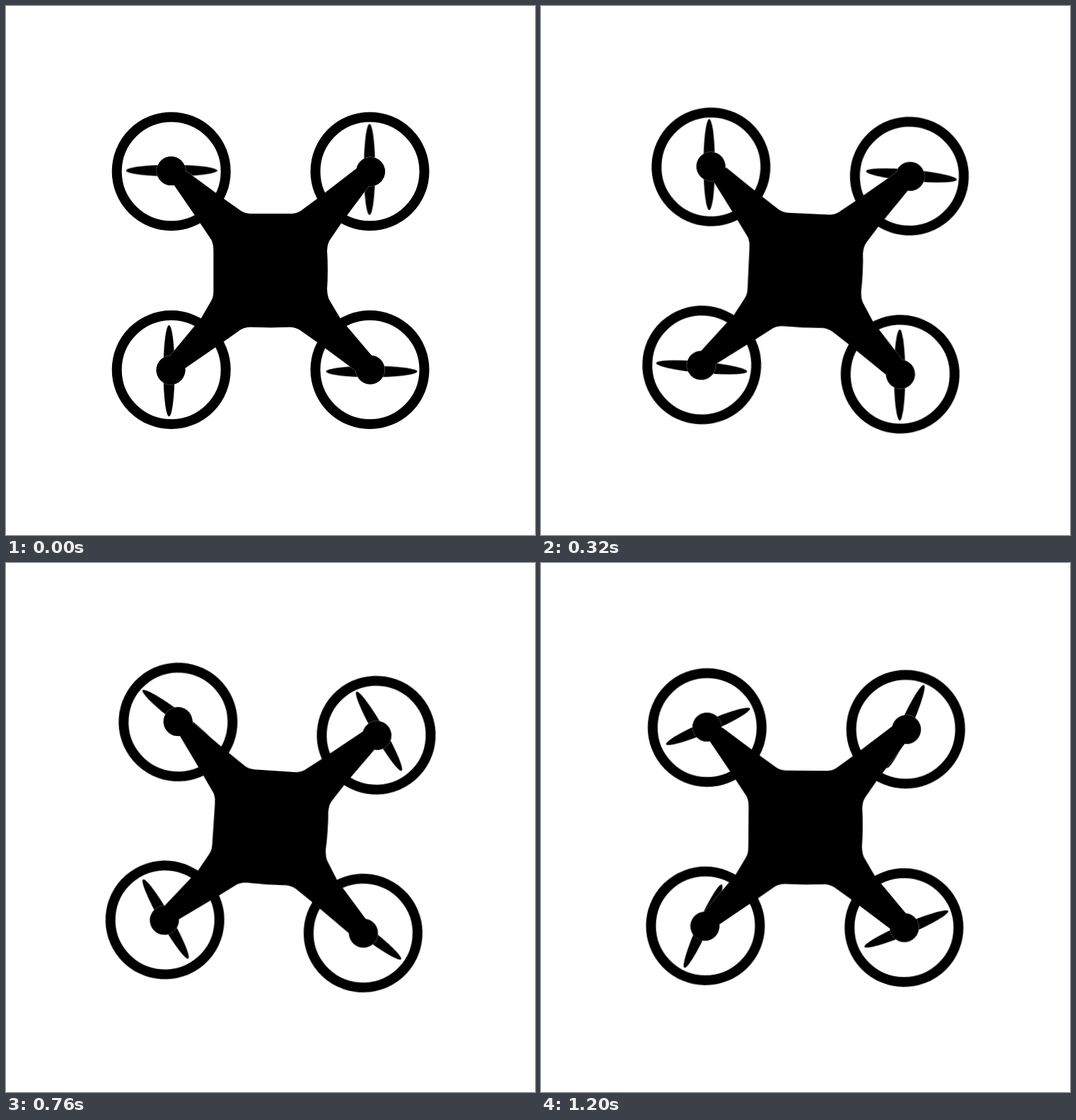
Write an HTML page that moves like this. It is 748 px wide and 749 px high and loops after 1.24 s.

```html
<!DOCTYPE html>
<html lang="en">
<head>
<meta charset="utf-8">
<title>Quadcopter</title>
<style>
  html, body { margin: 0; width: 100%; height: 100%; overflow: hidden; background: #fff; }
  svg { display: block; width: 748px; height: 749px; }

  .drone { transform-origin: 374px 374.5px; animation: sway 1240ms -1ms infinite; }
  .cw { animation: spin 1240ms -1ms infinite; }
  .ccw { animation: spin-back 1240ms -1ms infinite; }
  .seam { stroke: #fff; stroke-width: 1; stroke-opacity: .5; }
  .rings { fill: none; stroke: #000; stroke-width: 14; }

  /* Motion advances in 40 ms ticks */
  @keyframes sway {
    0% { transform: rotate(0deg); animation-timing-function: steps(15); }
    48.387% { transform: rotate(5deg); animation-timing-function: steps(16); }
    100% { transform: rotate(.2deg); }
  }
  @keyframes spin {
    0% { transform: rotate(0deg); animation-timing-function: steps(5); }
    16.129% { transform: rotate(52.6deg); animation-timing-function: steps(11); }
    51.6129% { transform: rotate(180deg); animation-timing-function: steps(15); }
    100% { transform: rotate(347.5deg); }
  }
  @keyframes spin-back {
    0% { transform: rotate(0deg); animation-timing-function: steps(5); }
    16.129% { transform: rotate(-52.6deg); animation-timing-function: steps(11); }
    51.6129% { transform: rotate(-180deg); animation-timing-function: steps(15); }
    100% { transform: rotate(-347.5deg); }
  }
</style>
</head>
<body>
<svg viewBox="0 0 748 749">
  <defs>
    <g id="frame">
      <path d="M255 234 L308 273 L332 290 Q338 294 346 294 H404 Q411 294 417 290
               L440 273 L497 229 L513 255 L475 306 L458 331 Q454 337 454 347
               Q455.5 375 454 400 Q454 410 457 416 L473 443 L517 495 L498 519
               L440 476 L416 459 Q410 455 402 454.5 Q374 456 346 454.5 Q338 454.5 332 458
               L308 475 L250 515 L232 495 L276 442 L290 418 Q293.5 412 293.5 404
               V346 Q293.5 338 291 332 L273 305 L238 254 Z"/>
      <circle cx="233.5" cy="233.5" r="20.5"/>
      <circle cx="515.5" cy="234.5" r="20.5"/>
      <circle cx="233" cy="515.5" r="20.5"/>
      <circle cx="515" cy="515" r="20.5"/>
    </g>
  </defs>
  <g class="drone">
    <!-- Each blade sits slightly off its pivot, so it wobbles as it turns -->
    <g transform="translate(233.5 230.5)"><ellipse class="cw" cx=".5" cy="2.5" rx="64.5" ry="8"/></g>
    <g transform="translate(516.5 230.5)"><ellipse class="ccw" cx="-2.5" cy="1" rx="8" ry="64.5"/></g>
    <g transform="translate(233 515.7)"><ellipse class="ccw" cx="-2.5" cy=".8" rx="8" ry="64.5"/></g>
    <g transform="translate(516.2 515.2)"><ellipse class="cw" cx=".8" cy="2.3" rx="64.5" ry="8"/></g>
    <use href="#frame" class="seam"/>
    <use href="#frame"/>
    <g class="rings">
      <circle cx="233.7" cy="234.2" r="77"/>
      <circle cx="514.5" cy="234.2" r="77"/>
      <circle cx="233.7" cy="515" r="77"/>
      <circle cx="514.5" cy="515" r="77"/>
    </g>
  </g>
</svg>
</body>
</html>
```
